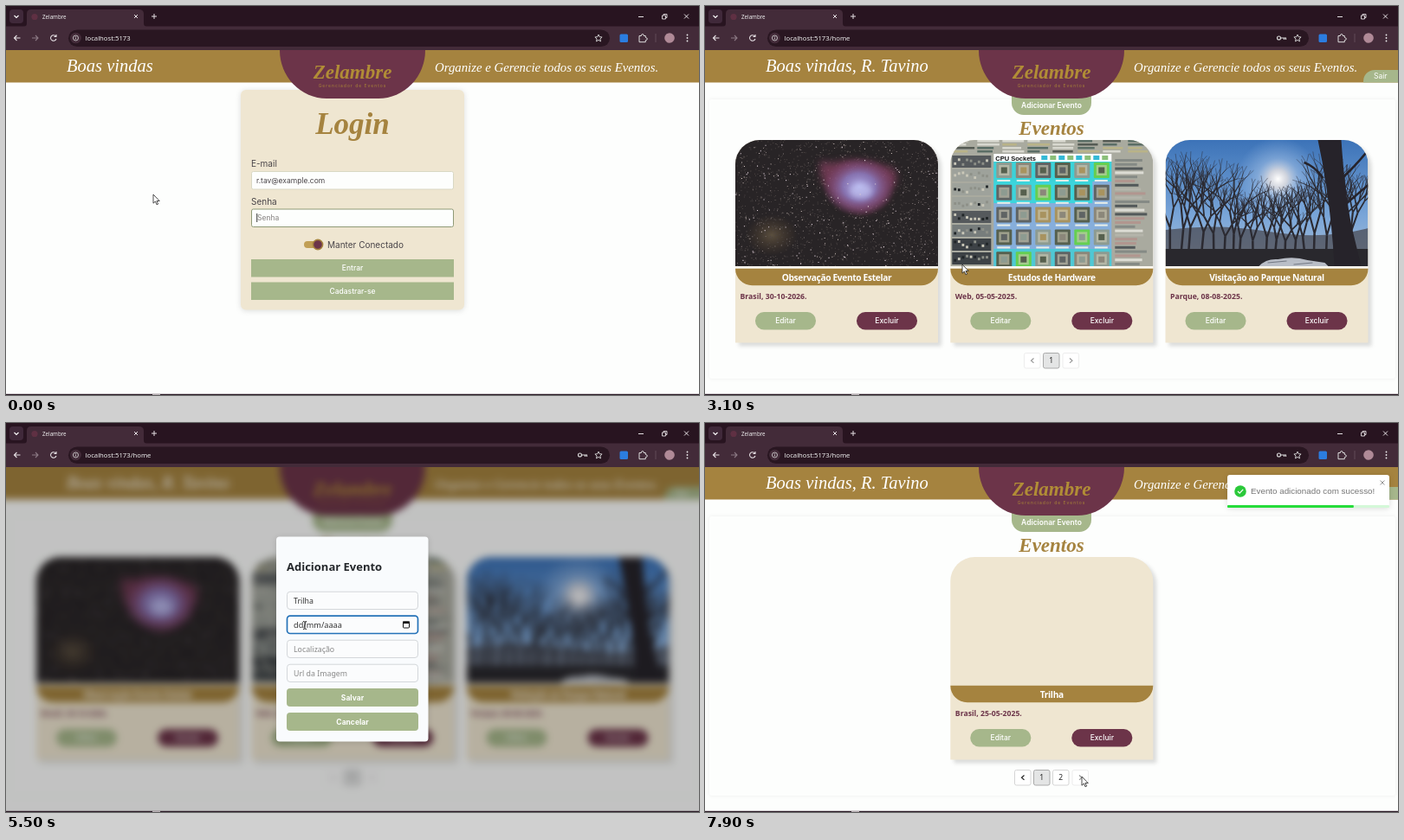
These frames come from a looping animation (800x450 px, 8000 ms). An HTML page:

```html
<!DOCTYPE html>
<html lang="pt-BR">
<head>
<meta charset="utf-8">
<style>
html, body { margin: 0; width: 100%; height: 100%; overflow: hidden; background: #fdfefd }
svg { display: block; width: 800px; height: 450px }
text { white-space: pre }
.ui { font-family: Inter, sans-serif }
.seg { font-family: "Noto Sans", "Open Sans", sans-serif }
.script { font-family: "Liberation Serif", serif; font-style: italic }
.toastText { font-family: "Liberation Sans", sans-serif }
.soft { filter: drop-shadow(0 1px 3px #0002) }
.lift { filter: drop-shadow(4px 4px 2px #0002) }
</style>
</head>
<body>
<svg id="stage" viewBox="0 0 800 450"></svg>
<script>
const GOLD = '#a5833f', PLUM = '#6c3449', GREEN = '#a6b78b', BEIGE = '#efe6d1', INK = '#4a4549', BLUE = '#2472b8';
const $ = id => document.getElementById(id);

let seed = 7;
const rnd = (a = 1, b = 0) => {
  seed = (seed * 1664525 + 1013904223) % 4294967296;
  return b + (a - b) * seed / 4294967296;
};
const pick = list => list[Math.floor(rnd(list.length))];
const many = (n, f) => Array.from({ length: n }, (_, i) => f(i)).join('');

const rect = (x, y, w, h, fill, rx = 0, more = '') =>
  `<rect x="${x}" y="${y}" width="${w}" height="${h}" rx="${rx}" fill="${fill}" ${more}/>`;
const path = (d, fill, more = '') => `<path d="${d}" fill="${fill}" ${more}/>`;
const line = (d, color, width = 1, more = '') => path(d, 'none', `stroke="${color}" stroke-width="${width}" ${more}`);
const dot = (x, y, r, fill, more = '') => `<circle cx="${x}" cy="${y}" r="${r}" fill="${fill}" ${more}/>`;
const oval = (x, y, rx, ry, fill, more = '') => `<ellipse cx="${x}" cy="${y}" rx="${rx}" ry="${ry}" fill="${fill}" ${more}/>`;
const text = (x, y, s, size, fill, cls = 'ui', more = '') =>
  `<text x="${x}" y="${y}" font-size="${size}" fill="${fill}" class="${cls}" ${more}>${s}</text>`;
const mid = 'text-anchor="middle"', bold = 'font-weight="700"', semi = 'font-weight="600"';
const group = (id, body, more = '') => `<g id="${id}" ${more}>${body}</g>`;
const button = (x, y, w, h, s, fill, rx, weight = 500) =>
  rect(x, y, w, h, fill, rx) + text(x + w / 2, y + h / 2 + 3, s, 8.5, '#fff', 'ui', `${mid} font-weight="${weight}"`);

const glow = (id, ...stops) => `<radialGradient id="${id}">` +
  stops.map(([o, c, a]) => `<stop offset="${o}" stop-color="${c}" stop-opacity="${a}"/>`).join('') + '</radialGradient>';
const defs = `<defs>
  <clipPath id="photo"><path d="M0 146V28A28 28 0 0 1 28 0H206A28 28 0 0 1 234 28V146Z"/></clipPath>
  <linearGradient id="sky" x2="0" y2="1"><stop stop-color="#3c73b8"/><stop offset=".6" stop-color="#79a5d8"/><stop offset="1" stop-color="#a9bfd8"/></linearGradient>` +
  glow('sun', [0, '#fff', 1], [.22, '#f6ebe4', .75], [.5, '#bcd3f0', .4], [1, '#a5c6ee', 0]) +
  glow('core', [0, '#b3b2ee', .95], [.45, '#8b7cc0', .85], [1, '#8a4479', 0]) +
  glow('dust', [0, '#8d7a58', .5], [1, '#6a5030', 0]) + '</defs>';

// Photos, drawn in a 234 x 146 box
function nebula() {
  const stars = (n, s) => many(n, () => `M${rnd(234).toFixed(1)} ${rnd(146).toFixed(1)}h${s}v${s}h-${s}z`);
  return rect(0, 0, 234, 146, '#282426') + oval(42, 110, 30, 24, 'url(#dust)') +
    path(stars(1500, 1), '#4b4443') + path(stars(350, .9), '#8d8280') + path(stars(90, 1), '#d0c2bd') +
    path('M98 24Q112 28 124 24Q152 20 184 34Q190 46 180 58Q176 76 150 84Q126 84 112 66Q96 48 98 24', '#83405f', 'opacity=".75" style="filter:blur(4px)"') +
    oval(143, 54, 42, 34, 'url(#core)') + oval(145, 59, 13, 9, '#c3c6f4', 'opacity=".65" style="filter:blur(3px)"') +
    path(stars(110, 1.1), '#d8c9d2');
}

function sockets() {
  const chips = ['#56604e', '#8b877a', '#a8935f', '#5f6464', '#8d9b91'];
  const boards = ['#3d4246', '#777d7c', '#9ea29b', '#55595c'];
  const strips = ['#858a85', '#b4b4aa', '#53595a', '#b1968f', '#dcdcd4'];
  let out = rect(0, 0, 234, 146, '#a9aa9f') +
    many(32, i => rect(i % 8 * 29 + 2, Math.floor(i / 8) * 4, rnd(27, 14), 2.5, pick(['#555b54', '#d8d8cf', '#b9b388', '#5b6e66'])));
  out += rect(50, 16, 136, 9, '#fff') + text(52, 23.5, 'CPU Sockets', 7.5, '#111', 'toastText', bold) +
    many(8, i => rect(105 + i * 10, 18, 7, 5, i % 2 ? '#8bbf7a' : '#35b9d6'));
  out += rect(50, 25, 136, 121, '#86aedb') + rect(50, 25, 136, 23, '#3cd2d8') + rect(50, 48, 114, 25, '#3cd5dc') +
    rect(50, 126, 136, 20, '#4fc8d4');
  for (let row = 0; row < 5; row++) for (let col = 0; col < 6; col++) {
    const x = 53 + col * 22.5, y = 26 + row * 25.8, lime = (row * 3 + col) % 8 == 5;
    out += rect(x, y, 18, 18, lime ? '#65cf51' : pick(chips), 1) + rect(x + 3, y + 3, 12, 12, '#cfcbb6', 0, 'opacity=".6"') +
      rect(x + 5.5, y + 5.5, 7, 7, pick(chips)) + rect(x + 1, y + 20, 15, 2, '#e9efe9');
  }
  out += many(8, i => rect(2, 18 + i * 16, 45, 14, pick(boards)) +
    many(9, k => rect(4 + k * 4.6, 20 + i * 16 + rnd(7), 2.8, 3, pick(['#c9c7b8', '#202527', '#8d9088']))));
  out += many(26, i => rect(190, 22 + i * 4.8, rnd(42, 22), 3, pick(strips)));
  return out;
}

function park() {
  const wood = ['', '', '', '', '', ''];
  const grow = (x, y, len, angle, level) => {
    const u = x + Math.cos(angle) * len, v = y + Math.sin(angle) * len;
    wood[level] += `M${x.toFixed(1)} ${y.toFixed(1)}L${u.toFixed(1)} ${v.toFixed(1)}`;
    if (!level) return;
    const upward = angle + (-Math.PI / 2 - angle) * .2;
    for (const side of [-1, 1]) grow(u, v, len * rnd(.92, .6), upward + side * rnd(.5, .12), level - 1);
  };
  for (let i = 0; i < 19; i++) {
    const tall = Math.abs(i - 10) / 9;
    grow(i * 12 + rnd(8), 138, rnd(24, 18) + tall * 15, -Math.PI / 2 + rnd(.12, -.12), 5);
  }
  return rect(0, 0, 234, 146, 'url(#sky)') + dot(130, 45, 48, 'url(#sun)') +
    path('M0 104Q60 96 120 106T234 102V146H0Z', '#45444a', 'opacity=".7"') +
    wood.map((d, i) => line(d, '#2b2a31', .45 + i * .42)).join('') +
    rect(0, 126, 234, 20, '#29282d') +
    path('M176 0H203Q207 60 215 100L226 146H195Q191 70 176 0', '#26232a') +
    line('M200 48Q216 34 234 12M206 76L234 52M182 44Q172 30 160 26', '#26232a', 2.5) +
    path('M108 146Q116 137 130 138Q148 134 164 139L184 142L188 146Z', '#b9bec7') +
    line('M118 142L140 140M148 144L170 142', '#737984', 1.2);
}

function card(x, title, info, photo) {
  return `<g transform="translate(${x} 155)">` +
    path('M0 234.5V28A28 28 0 0 1 28 0H206A28 28 0 0 1 234 28V234.5Z', BEIGE, 'class="lift"') +
    (photo ? `<g clip-path="url(#photo)">${photo}</g>` + rect(0, 146, 234, 2.8, '#fbf8f0') : '') +
    path('M0 148.8H234A19.5 19.5 0 0 1 214.5 168.3H19.5A19.5 19.5 0 0 1 0 148.8', GOLD) +
    text(117, 162.5, title, 10.2, '#fff', 'seg', `${mid} ${bold} letter-spacing="-.35"`) +
    text(5.5, 184, info, 8.7, PLUM, 'seg', semi) +
    button(23, 199, 70, 20.5, 'Editar', GREEN, 10) + button(140, 199, 70, 20.5, 'Excluir', PLUM, 10) + '</g>';
}

const pageBox = (x, s, on, faint) =>
  rect(x + .5, 401.5, 18.5, 17.5, on ? '#e4e5e5' : '#fff', 2, `stroke="${on ? '#aaa' : faint ? '#ededed' : '#d5d5d5'}"`) +
  (s == '<' || s == '>' ? line(s == '<' ? `M${x + 11.5} 407.5l-3 2.7l3 2.7` : `M${x + 8.5} 407.5l3 2.7l-3 2.7`, faint ? '#999' : '#222', 1.2)
    : text(x + 9.7, 413.3, s, 8.5, '#222', 'seg', mid));

const header = name => rect(-30, 20, 860, 68.5, GOLD) +
  text(70, 76, 'Boas vindas' + name, 20.5, '#fff', 'script') +
  text(495, 76, 'Organize e Gerencie todos os seus Eventos.', 14.8, '#fff', 'script') +
  path('M316 20H484V51A54 56 0 0 1 430 107H370A54 56 0 0 1 316 51Z', PLUM) +
  text(400, 84, 'Zelambre', 23, '#b18d36', 'script', mid + ' ' + bold) +
  text(400, 94, 'Gerenciador de Eventos', 5, '#a88437', 'ui', mid + ' letter-spacing="1"');

const field = (y, id) => rect(283.5, y, 233, 20.5, '#fdfefd', 2, `id="${id}" stroke="#d9d8c4"`);
const login = rect(271, 97, 258, 254.5, BEIGE, 6, 'class="soft"') + header('') +
  text(400, 148, 'Login', 35, GOLD, 'script', mid + ' ' + bold) +
  text(283, 185.5, 'E-mail', 10, INK) + field(191.5, 'mail') + text(289, 204.5, 'r.tav@example.com', 8.5, INK) +
  text(283, 229.5, 'Senha', 10, INK) + field(235, 'pass') + text(290, 248, 'Senha', 8.5, '#85817f') +
  group('passCaret', rect(289.3, 240, .9, 10, '#222')) +
  rect(344, 272, 20, 8, '#c19f55', 4) + dot(360, 276, 5.6, PLUM, `stroke="${GOLD}" stroke-width="1.6"`) +
  text(371, 280, 'Manter Conectado', 10, INK) +
  button(283, 293, 234, 20.5, 'Entrar', GREEN, 0) + button(283, 319.5, 234, 20.5, 'Cadastrar-se', GREEN, 0);

const home = rect(-30, 20, 860, 460, '#fdfefd') +
  rect(5, 108, 792, 323, '#fdfefd', 3, 'style="filter:drop-shadow(0 0 2px #0001)"') +
  path('M354 88H446V112A14 14 0 0 1 432 126H368A14 14 0 0 1 354 112Z', GREEN) +
  text(400, 117.5, 'Adicionar Evento', 8.5, '#fff', 'ui', mid + ' ' + semi) +
  header(', R. Tavino') +
  path('M760 88.5V87A13 13 0 0 1 773 74H830V88.5Z', GREEN) + text(772, 84.2, 'Sair', 8.5, '#fff') +
  text(400, 149, 'Eventos', 23, GOLD, 'script', mid + ' ' + bold) +
  group('cards', card(35, 'Observação Evento Estelar', 'Brasil, 30-10-2026.', nebula()) +
    card(283.3, 'Estudos de Hardware', 'Web, 05-05-2025.', sockets()) +
    card(531.5, 'Visitação ao Parque Natural', 'Parque, 08-08-2025.', park())) +
  group('newCard', card(283.3, 'Trilha', 'Brasil, 25-05-2025.')) +
  group('onePage', pageBox(368, '<', 0, 1) + pageBox(390, '1', 1) + pageBox(412.5, '>', 0, 1)) +
  group('twoPages', pageBox(357, '<') + pageBox(379, '1', 1) + pageBox(401, '2') + pageBox(423.5, '>', 0, 1));

const rows = [195, 223, 251, 279];
const modal = rect(-10, 51, 820, 400, '#000', 0, 'opacity=".235"') +
  rect(312, 131.5, 175.5, 237, '#f9fbfd', 4, 'class="soft"') +
  text(324, 171, 'Adicionar Evento', 13, '#25282c', 'seg', semi) +
  rows.map((y, i) => rect(324.5, y + .2, 151, 20.3, '#fbfcfd', 3.5, `id="box${i}"`)).join('') +
  rect(362, 226.5, 21, 13.5, BLUE, 0, 'id="yearMark"') +
  rows.map((y, i) => text(332, y + 13.8, '', i == 1 ? 9.2 : 8.8, '#333', 'seg', `id="value${i}"`)).join('') +
  rect(458.5, 230, 7, 7, 'none', 1, 'stroke="#111"') + rect(458, 229.5, 8, 2.5, '#111') +
  rect(0, 0, .9, 11, '#222', 0, 'id="caret"') +
  button(324, 307, 152, 21, 'Salvar', GREEN, 4, 700) + button(324, 335, 152, 21, 'Cancelar', GREEN, 4, 700);

const toast = rect(603, 60, 187, 38, '#fff', 3, 'class="soft"') +
  dot(618, 79, 6.8, '#2bc93a') + line('M615 79l2.2 2.2l4-4.4', '#fff', 1.2) +
  text(630, 82.3, 'Evento adicionado com sucesso!', 9.8, '#757575', 'toastText') +
  line('M779.5 66.5l5 5m0-5l-5 5', '#999') + rect(603, 95, 187, 3, '#d4f8d8', 1) + rect(603, 95, 187, 3, '#26dc3a', 1, 'id="bar"');

const chrome = rect(0, 0, 800, 24, '#281420') + rect(0, 23.5, 800, 27.5, '#432b39') +
  rect(4, 4, 16, 16, '#40293a', 4) + line('M9.5 11l2.5 2.5l2.5-2.5', '#fff', 1.1) +
  path('M20 24Q24 24 24 20V9Q24 4 29 4H153Q159 4 159 9V20Q159 24 163 24Z', '#432b39') +
  dot(33, 12.5, 3.6, '#5f3043') + text(42, 14.8, 'Zelambre', 6.2, '#eee', 'seg') +
  line('M148 10l4 4m0-4l-4 4M168 12h6m-3-3v6M730 12.5h6M783 9.5l5 5m0-5l-5 5', '#e5dfe3', 1) +
  line('M757.5 11h4v4h-4zM759 11v-1.5h4V13.5h-1.5', '#e5dfe3', .9) +
  line('M16.5 37h-7m3-3l-3 3l3 3', '#e5dfe3', 1.1) + line('M30 37h7m-3-3l3 3l-3 3', '#8c7a85', 1.1) +
  line('M57.5 35a3.3 3.3 0 1 0 .5 3M58 33v2.5h-2.5', '#e5dfe3', 1.1) +
  rect(72, 27.5, 625, 19.5, '#291621', 10) + dot(80.5, 37, 6.3, '#432b39') +
  dot(80.5, 37, 3, 'none', 'stroke="#ddd" stroke-width=".8"') + line('M80.5 36.5v2M80.5 35v.7', '#ddd', .8) +
  text(91.5, 39.8, '', 7.7, '#eee', 'seg', 'id="url"') +
  group('key', dot(662.5, 37, 2, 'none', 'stroke="#ddd" stroke-width="1.1"') + line('M664.5 37h6v2m-2-2v2', '#ddd', 1.1)) +
  path('M684 33l1.2 2.7l2.9.3l-2.2 2l.6 2.9l-2.5-1.5l-2.5 1.5l.6-2.9l-2.2-2l2.9-.3z', 'none', 'stroke="#ddd" stroke-width=".9"') +
  rect(708.5, 32.5, 9.5, 9.5, '#2b7de0', 1.5) +
  line('M731 34.5h2.3q0-2 1.5-2t1.5 2h2v2q2 .2 2 1.6t-2 1.6v2h-7.3z', '#ddd', 1) + line('M750 32v10', '#6b5361', .8) +
  dot(766, 37, 5.8, '#b08a97') + dot(786.5, 33.5, .9, '#eee') + dot(786.5, 37, .9, '#eee') + dot(786.5, 40.5, .9, '#eee') +
  rect(0, 448.8, 800, 1.2, '#2b1b27') + rect(169, 448.8, 9, 1.2, '#b9b0b5');

const outlined = 'stroke="#222" stroke-width=".8"';
const pointers =
  group('arrow', path('M0 0V10.2L2.4 8L4 11.8L5.6 11.1L4 7.5H7.2Z', '#fff', outlined)) +
  group('hand', path('M-1.2 7V1Q0-1 1.2 1V5Q3-.0 3.2 5.4Q5 4.2 5 6Q6.8 5.4 6.6 7.4V10Q6.4 13 4 13H.5Q-1 12-3.6 7.6Q-3.2 5.8-1.2 8Z', '#fff', outlined)) +
  group('beam', line('M-2-4.5Q0-4.5 0-3.5Q0-4.5 2-4.5M0-3.5V3.5M-2 4.5Q0 4.5 0 3.5Q0 4.5 2 4.5', '#222', 1));

$('stage').innerHTML = defs + group('login', login) + group('home', home) + group('modal', modal) +
  group('toast', toast) + chrome + group('pointer', pointers);

// time, x, y, shape on the way to the next stop
const track = [
  [0, 170, 218, 'arrow'], [900, 150, 222, 'arrow'], [1900, 361, 279, 'hand'], [2200, 361, 279, 'hand'],
  [2500, 390, 303, 'hand'], [2600, 390, 303, 'arrow'], [3600, 204, 295, 'arrow'], [4100, 398, 114, 'hand'],
  [4300, 398, 114, 'arrow'], [4500, 381, 207, 'beam'], [5300, 381, 207, 'beam'], [5500, 345, 234, 'beam'],
  [6000, 345, 234, 'beam'], [6300, 390, 268, 'beam'], [6900, 390, 268, 'beam'], [7050, 380, 290, 'beam'],
  [7200, 373, 300, 'arrow'], [7300, 385, 318, 'hand'], [7400, 385, 318, 'arrow'], [7700, 435, 409, 'hand'],
  [7800, 435, 409, 'arrow'], [8000, 435, 409, 'arrow']];

const show = (id, on) => $(id).style.display = on ? '' : 'none';
const typed = (s, t, start, step) => s.slice(0, Math.max(0, Math.floor((t - start) / step) + 1));
const hints = ['Nome do Evento', 'dd/mm/aaaa', 'Localização', 'Url da Imagem'];

function fillForm(t) {
  const focus = t < 5500 ? 0 : t < 6400 ? 1 : t < 7100 ? 2 : 3;
  const date = t < 5700 ? hints[1] : t < 5900 ? '25/mm/aaaa' : t < 6100 ? '25/05/aaaa' : '25/05/2025';
  const values = [typed('Trilha', t, 4800, 100), date, typed('Brasil', t, 6500, 90), ''];
  values.forEach((v, i) => {
    const value = $('value' + i), box = $('box' + i);
    value.textContent = v || hints[i];
    value.setAttribute('fill', v ? '#333' : '#888');
    box.setAttribute('stroke', i == focus ? BLUE : '#d4d7da');
    box.setAttribute('stroke-width', i == focus ? 1.7 : 1);
  });
  const marked = focus == 1 && t >= 6100;
  show('yearMark', marked);
  if (marked) $('value1').innerHTML = '25/05/<tspan fill="#fff">2025</tspan>';
  show('caret', focus != 1 && t != 4700);
  const end = values[focus] ? $('value' + focus).getComputedTextLength() : 0;
  $('caret').setAttribute('x', 332 + end);
  $('caret').setAttribute('y', rows[focus] + 5);
}

function draw() {
  const t = Math.floor(performance.now() % 8000 / 100) * 100;
  const inside = t >= 2600, open = t >= 4300 && t < 7400, saved = t >= 7400, second = t >= 7800;
  show('login', !inside);
  show('home', inside);
  show('key', inside);
  show('modal', open);
  show('toast', saved);
  show('cards', !second);
  show('newCard', second);
  show('onePage', !saved);
  show('twoPages', saved);
  $('url').textContent = 'localhost:5173' + (inside ? '/home' : '');
  $('home').style.filter = open ? 'blur(4px)' : '';
  const focused = t < 1900;
  $('pass').setAttribute('stroke', focused ? '#8f9a77' : '#d9d8c4');
  show('passCaret', focused && t % 1000 < 500);
  if (open) fillForm(t);
  $('bar').setAttribute('width', 187 * (1 - .22 * Math.max(0, t - 7400) / 500));

  const i = track.findIndex((p, k) => t >= p[0] && t < track[k + 1][0]);
  const [a, x, y, shape] = track[i], [b, u, v] = track[i + 1];
  const k = (t - a) / (b - a), ease = k * k * (3 - 2 * k);
  $('pointer').setAttribute('transform', `translate(${x + (u - x) * ease} ${y + (v - y) * ease})`);
  for (const id of ['arrow', 'hand', 'beam']) show(id, id == shape);
  requestAnimationFrame(draw);
}
draw();
</script>
</body>
</html>
```
